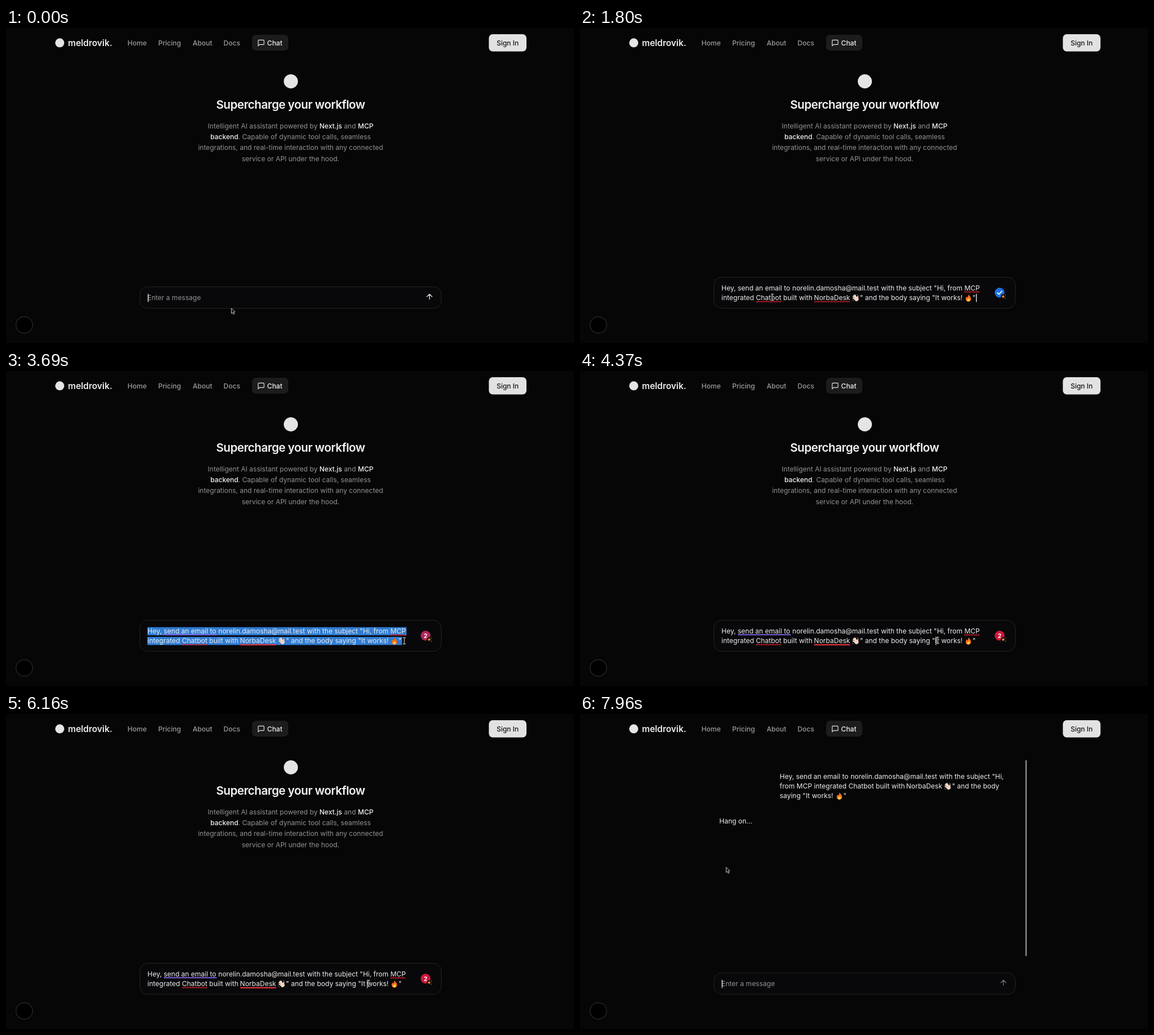
These frames come from a looping animation (1004x558 px, 8 s). An HTML page:

```html
<!DOCTYPE html>
<html lang="en">
<head>
<meta charset="utf-8">
<title>Chat assistant</title>
<style>
html, body { margin: 0; width: 100%; height: 100%; overflow: hidden; background: #060607; }
svg { display: block; width: 100%; height: 100%; }
text { font: 400 12px Inter, Roboto, sans-serif; fill: #ededed; white-space: pre; }
.nav { font-weight: 500; fill: #9c9c9c; }
.brand { font-size: 15.43px; font-weight: 600; }
.title { font-size: 20.57px; font-weight: 600; letter-spacing: -.5px; fill: #f5f5f5; }
.muted { fill: #939393; }
.strong { font-weight: 500; fill: #f2f2f2; }
.mid { text-anchor: middle; }
.line { fill: none; stroke: #e8e8e8; stroke-width: 2; stroke-linecap: round; stroke-linejoin: round; }
.box { fill: #08080a; stroke: #232320; }
.sel { fill: #2f7cd3; }

/* hard cuts */
.hero, .chat, .empty, .filled, .marks, .badge, .tick, .count, .caret, .arrow, .beam, .send {
  animation: 8s step-end infinite;
}
.hero { animation-name: hero; }
.chat { animation-name: chat; }
.empty { animation-name: empty; }
.filled { animation-name: filled; }
.marks { animation-name: marks; }
.badge { animation-name: badge; }
.tick { animation-name: tick; }
.count { animation-name: marks; }
.caret { animation-name: caret; }
.arrow { animation-name: arrow; }
.beam { animation-name: beam; }
.send { animation-name: send; }
@keyframes hero { 0% { opacity: 1 } 86.125% { opacity: 0 } }
@keyframes chat { 0% { opacity: 0 } 86.125% { opacity: 1 } }
@keyframes empty { 0%, 86.125% { opacity: 1 } 16.375% { opacity: 0 } }
@keyframes filled { 0%, 86.125% { opacity: 0 } 16.375% { opacity: 1 } }
@keyframes badge { 0% { opacity: 0 } 17.5% { opacity: 1 } }
@keyframes marks { 0% { opacity: 0 } 45.5% { opacity: 1 } }
@keyframes tick { 0% { opacity: 1 } 45.5% { opacity: 0 } }
@keyframes send { 0% { stroke: #e8e8e8 } 86.125% { stroke: #777 } }
@keyframes caret {
  0% { transform: translate(250.6px, 471px); opacity: 1 }
  16.375% { transform: translate(700px, 471px); opacity: 1 }
  23.9% { transform: translate(700px, 471px); opacity: 0 }
  30% { transform: translate(250.3px, 454px); opacity: 1 }
  31.25% { transform: translate(250.3px, 454px); opacity: 0 }
  54.625% { transform: translate(628.5px, 471px); opacity: 1 }
  62.1% { transform: translate(628.5px, 471px); opacity: 0 }
  69.6% { transform: translate(628.5px, 471px); opacity: 1 }
  76.6% { transform: translate(638px, 471px); opacity: 1 }
  86.125% { transform: translate(250.6px, 471px); opacity: 1 }
}
@keyframes arrow {
  0%, 62.4%, 96.6% { opacity: 1 }
  1.2%, 71.7% { opacity: 0 }
}
@keyframes beam {
  0%, 10.875%, 62.4%, 96.6% { opacity: 0 }
  1.2%, 16.375%, 71.7% { opacity: 1 }
}

/* continuous motion */
.cursor { animation: move 8s linear infinite; }
.sel1 { animation: sel1 8s linear infinite; }
.sel2 { animation: sel2 8s linear infinite; }
.disc { animation: disc 8s linear infinite; }
@keyframes move {
  0%, .6% { transform: translate(398px, 496px) }
  4.9%, 16.375% { transform: translate(363px, 482px) }
  22.5% { transform: translate(340px, 477px) }
  26.1% { transform: translate(328px, 472px) }
  30%, 31.25% { transform: translate(251px, 461px) }
  35.75% { transform: translate(380px, 458px) }
  39% { transform: translate(510px, 468px) }
  46.1%, 47.4% { transform: translate(704px, 478px) }
  52.75%, 56% { transform: translate(632px, 477px) }
  61% { transform: translate(700px, 452px) }
  64.25% { transform: translate(768px, 426px) }
  70% { transform: translate(766px, 424px) }
  74.6% { transform: translate(736px, 470px) }
  77%, 95% { transform: translate(641px, 477px) }
  96.5% { transform: translate(618px, 466px) }
  99.5%, 100% { transform: translate(258px, 271px) }
}
@keyframes sel1 {
  0%, 31.25% { width: 0 }
  35.75% { width: 94px }
  38.9% { width: 252px }
  39%, 54.62% { width: 458px }
  54.625%, 100% { width: 0 }
}
@keyframes sel2 {
  0%, 38.99% { width: 0 }
  39% { width: 255px }
  46%, 54.62% { width: 450px }
  54.625%, 100% { width: 0 }
}
@keyframes disc {
  0%, 45.1% { fill: #1b6fe0 }
  46.35%, 100% { fill: #d0173f }
}
</style>
</head>
<body>
<svg viewBox="0 0 1004 558">
  <defs>
    <pattern id="wave" width="4" height="3" patternUnits="userSpaceOnUse">
      <path d="M-1 .5L0 .7 2 2.3 4 .7 5 .5" fill="none" stroke="#e0202a" stroke-width="1.1"/>
    </pattern>
    <symbol id="hand" viewBox="0 0 14 14">
      <g fill="none" stroke="#f1d3c0" stroke-linecap="round" stroke-width="1.9">
        <path d="M7 8L2.6 4.6M7.6 7L3.7 2.6M8.6 6.6L5.8 1.9M6 10L2.2 7.2M10.6 8L10.8 4.4"/>
      </g>
      <ellipse cx="8.4" cy="9.1" rx="3.6" ry="3.8" fill="#f1d3c0" transform="rotate(-40 8.4 9.1)"/>
      <path d="M9.2 1.2Q11 1.6 11.8 3M1 10.4Q1.6 12 3.4 12.8" fill="none" stroke="#8f9aa3" stroke-width=".9"/>
    </symbol>
    <symbol id="fire" viewBox="0 0 14 14">
      <path d="M7 .5C8 3 11.8 5 11.8 9.2 11.8 12 9.6 13.6 7 13.6S2.2 12 2.2 9.2C2.2 7 3.2 5.8 3.8 4.4 4.4 5 4.8 5.8 5 6.4 6.4 5 7.2 3 7 .5z" fill="#f26a1d"/>
      <path d="M7.2 6.2C7.8 8 9.6 8.8 9.6 10.8 9.6 12.6 8.4 13.4 7 13.4S4.4 12.6 4.4 10.8C4.4 9.8 4.8 9 5.4 8.6 5.8 9 6 9.2 6.2 9.6 7 8.6 7.4 7.6 7.2 6.2z" fill="#fdc84b"/>
    </symbol>
  </defs>

  <!-- header -->
  <circle cx="95" cy="26.3" r="8" fill="#e5e5e5"/>
  <text class="brand" x="109.5" y="32">meldrovik.</text>
  <text class="nav" x="214.8" y="31">Home</text>
  <text class="nav" x="269" y="31">Pricing</text>
  <text class="nav" x="330" y="31">About</text>
  <text class="nav" x="384.6" y="31">Docs</text>
  <rect x="435" y="12" width="64" height="28" rx="6.8" fill="#1c1c1c"/>
  <path class="line" transform="translate(444.1 19.6) scale(.571)" d="M21 15a2 2 0 0 1-2 2H7l-4 4V5a2 2 0 0 1 2-2h14a2 2 0 0 1 2 2z"/>
  <text class="strong" x="461.6" y="31">Chat</text>
  <rect x="853.5" y="11" width="66.5" height="30.5" rx="6.8" fill="#e2e2e2"/>
  <text class="mid" x="886.7" y="31" style="font-weight:500;fill:#171717">Sign In</text>

  <g class="hero">
    <circle cx="503.5" cy="94.5" r="12.5" fill="#e5e5e5"/>
    <text class="title mid" x="503" y="143">Supercharge your workflow</text>
    <text class="muted mid" x="503" y="177.5">Intelligent AI assistant powered by <tspan class="strong">Next.js</tspan> and <tspan class="strong">MCP</tspan></text>
    <text class="muted mid" x="503" y="196.9"><tspan class="strong">backend</tspan>. Capable of dynamic tool calls, seamless</text>
    <text class="muted mid" x="503" y="216.3">integrations, and real-time interaction with any connected</text>
    <text class="muted mid" x="503" y="235.7">service or API under the hood.</text>
  </g>

  <g class="chat">
    <text y="115"><tspan x="353">Hey, send an email to</tspan><tspan x="478.2">norelin.damosha@mail.test</tspan><tspan x="634.8">with the subject "Hi,</tspan></text>
    <text y="132"><tspan x="353">from MCP integrated Chatbot built with</tspan><tspan x="576.5">NorbaDesk</tspan><tspan x="657.5">" and the body</tspan></text>
    <text y="149.2"><tspan x="353">saying "It works!</tspan><tspan x="465.5">"</tspan></text>
    <use href="#hand" x="643" y="121" width="14" height="14"/>
    <use href="#fire" x="451.5" y="138" width="14" height="14"/>
    <text x="246.3" y="193.5">Hang on...</text>
    <rect x="787.5" y="82" width="2" height="346.5" fill="#a6a6a6"/>
  </g>

  <g class="empty">
    <rect class="box" x="236.5" y="458.5" width="533" height="38" rx="13.7"/>
    <text class="muted" x="250" y="482.2">Enter a message</text>
    <path class="line send" transform="translate(740.7 468.2) scale(.65)" d="M12 19V5M5 12l7-7 7 7"/>
  </g>

  <g class="filled">
    <rect class="box" x="236.5" y="441.5" width="533" height="55" rx="13.7"/>
    <rect class="sel sel1" x="250" y="453.8" width="0" height="14.4"/>
    <rect class="sel sel2" x="250" y="471" width="0" height="14.4"/>
    <text y="465.2"><tspan x="250">Hey, send an email to</tspan><tspan x="375.3">norelin.damosha@mail.test</tspan><tspan x="532">with the subject "Hi, from MCP</tspan></text>
    <text y="482.3"><tspan x="250">integrated Chatbot built with</tspan><tspan x="413.6">NorbaDesk</tspan><tspan x="494.8">" and the body saying "It works!</tspan><tspan x="693.8">"</tspan></text>
    <use href="#hand" x="480.3" y="471" width="14" height="14"/>
    <use href="#fire" x="679.5" y="471" width="14" height="14"/>
    <g fill="url(#wave)">
      <rect width="27" height="3" transform="translate(679 466)"/>
      <rect width="45" height="3" transform="translate(311 483.2)"/>
      <rect width="63" height="3" transform="translate(414 483.2)"/>
    </g>
    <g class="marks">
      <rect x="279" y="466.3" width="93.5" height="1.8" fill="#8a66f2"/>
      <rect x="414" y="484.2" width="63.5" height="1.8" fill="#e2363c"/>
    </g>
    <g class="badge">
      <circle class="disc" cx="741.7" cy="468.8" r="8.7" fill="#1b6fe0"/>
      <path class="line tick" d="M737.8 469l2.8 2.8 5-5.6"/>
      <text class="count mid" x="741.7" y="472.5" style="font-size:10px;font-weight:700;fill:#fff">2</text>
      <circle cx="748.2" cy="475.8" r="4.4" fill="#0b0909"/>
      <path d="M748 472.4l1 2.3 2.3 1-2.3 1-1 2.3-1-2.3-2.3-1 2.3-1z" fill="#f7951f"/>
      <path d="M751.2 472.6h1.2v1.2h-1.2zM751 478h1.2v1.2H751z" fill="#f7951f"/>
    </g>
  </g>

  <rect class="caret" width="1.2" height="14.4" fill="#fff"/>

  <circle cx="32.4" cy="526" r="14.7" fill="#000" stroke="#2c2c2c" stroke-width="1.2"/>

  <g class="cursor">
    <path class="arrow" d="M.4.4V9.8L2.6 7.9 4.2 11.2 5.7 10.5 4.2 7.2 7 7z" fill="#0a0a0a" stroke="#d6d6d6" stroke-width=".9"/>
    <g class="beam" fill="none">
      <path d="M-2.5-5.5H2.5M-2.5 5.5H2.5M0-5.5V5.5" stroke="#111" stroke-width="2.4"/>
      <path d="M-2.5-5.5H2.5M-2.5 5.5H2.5M0-5.5V5.5" stroke="#cfcfcf" stroke-width="1.1"/>
    </g>
  </g>
</svg>
</body>
</html>
```
